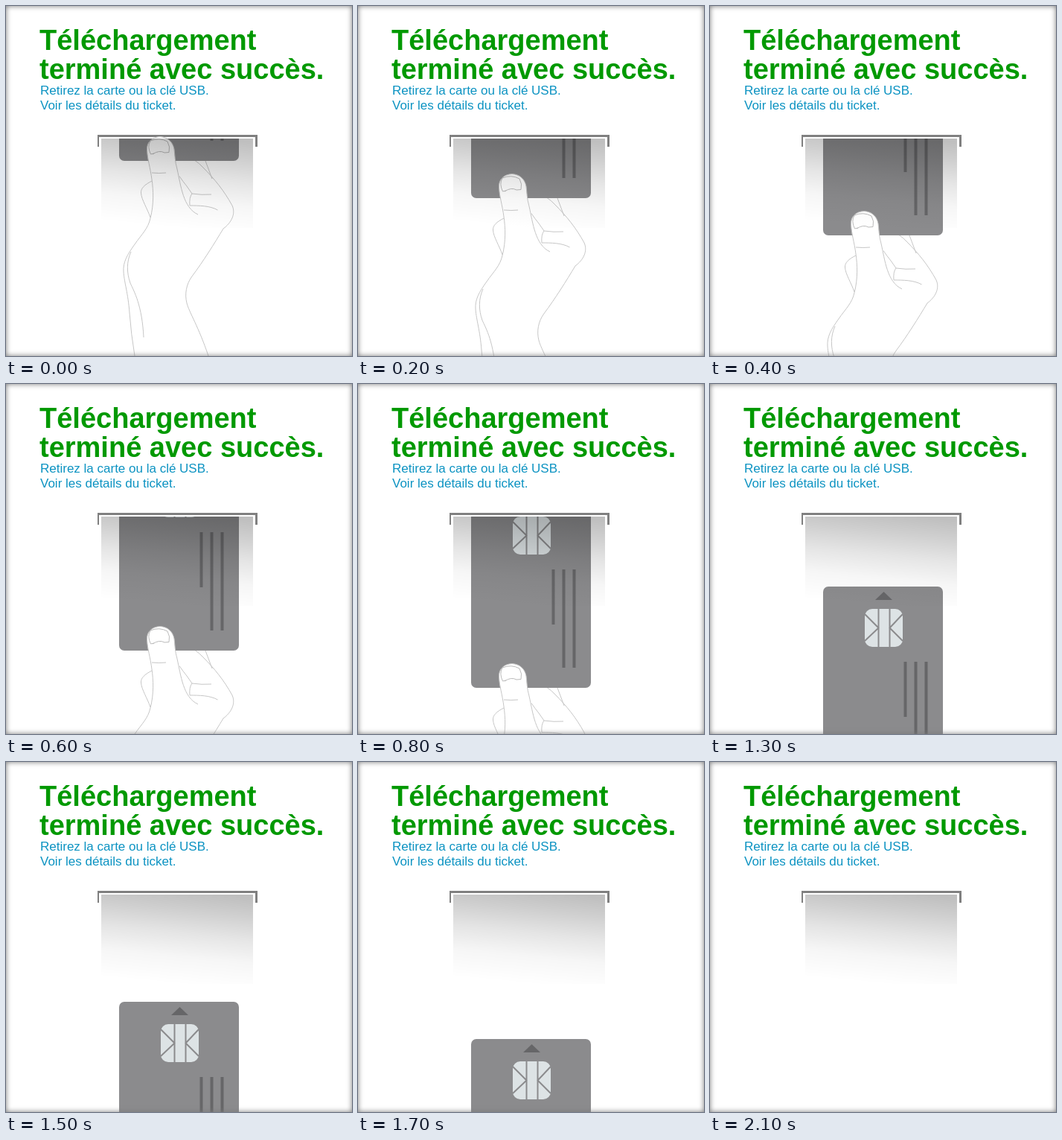
These frames come from a looping animation (465 by 470 pixels, 2.2 s). An HTML page with a canvas:

```html
<!DOCTYPE html>
<html lang="fr">
<head>
<meta charset="utf-8">
<title>Téléchargement terminé</title>
<style>
  html, body { margin: 0; width: 100%; height: 100%; overflow: hidden; background: #fff; }
  canvas, svg, .edge { position: absolute; left: 0; top: 0; width: 465px; height: 470px; }
  .edge { box-shadow: inset 0 0 7px #777; }
  text { font-family: "Liberation Sans", Arial, sans-serif; }
  .title { font-size: 38px; font-weight: bold; fill: #090; }
  .info { font-size: 17px; fill: #0c93c2; }
</style>
</head>
<body>
<canvas id="stage" width="465" height="470"></canvas>
<svg viewBox="0 0 465 470">
  <text class="title" x="45" y="59">Téléchargement</text>
  <text class="title" x="45" y="98">terminé avec succès.</text>
  <text class="info" x="46" y="119">Retirez la carte ou la clé USB.</text>
  <text class="info" x="46" y="139">Voir les détails du ticket.</text>
</svg>
<div class="edge"></div>
<script>
const ctx = document.getElementById('stage').getContext('2d');
const LOOP = 2200, STEP = 100, SLOT_Y = 178;
const GREY = '#8b8b8d', DARK = '#666668', LINE = '#c6c6c6';

// Hand paths, drawn for a card whose bottom edge is at y = 208
const thumbLeft = 'M207 175.5C196 176 189 183 189.500 193C190 206 194 217 196 233C198 247 199 266 194 285';
const thumbRight = 'M207 175.5C217 176 224 182 226 192C227 200 227 209 230 219C235 241 238 271 258 280';
const thumbFill = new Path2D(
  'M207 175.5C196 176 189 183 189.500 193C190 206 194 217 196 233Q198 247 198 262' +
  'L242 262C236 246 233 232 230 219C227 209 227 200 226 192C224 182 217 176 207 175.5Z');
const thumb = new Path2D(thumbLeft + thumbRight + 'M196 224Q206 225 215 224');
const nail = new Path2D(
  'M199 198L194.500 199Q189.500 189 194 181Q206 176 217 182Q221 189 219 196.500L213 197' +
  'M197 199Q206 193 213 197');
const hand = new Path2D(
  'M196 235C186 240 181 245 181.500 251C182 260 190 272 194 284' +
  'M194 285C191 299 182 307 173 320C163 334 157 344 158 357C159 372 164 385 166 412Q168 440 173 470V560' +
  'M168 330C162 343 162 358 167 372C172 383 183 402 185 445' +
  'M240 200Q256 207 264 216C281 233 293 248 304 268C309 279 303 291 292 299' +
  'C280 319 265 343 250 363C242 374 240 387 243 399C246 411 259 431 272 470L295 560' +
  'M265 200L277 232' +
  'M233 228.500Q238 236 243 242L250 252Q263 254 276 253' +
  'M250 252Q246 257 247 268C259 268 274 268 284.500 274');

const shade = ctx.createLinearGradient(240, 174, 228, 298);
[[0, .25], [.2, .19], [.45, .1], [.7, .035], [1, 0]].forEach(
  ([at, alpha]) => shade.addColorStop(at, `rgba(0,0,0,${alpha})`));

function box(color, x, y, w, h, r = 0) {
  ctx.fillStyle = color;
  ctx.beginPath();
  ctx.roundRect(x, y, w, h, r);
  ctx.fill();
}

function outline(path, color = LINE, width = 1) {
  ctx.strokeStyle = color;
  ctx.lineWidth = width;
  ctx.stroke(path);
}

function clipBelowSlot() {
  ctx.beginPath();
  ctx.rect(0, SLOT_Y, 465, 470);
  ctx.clip();
}

const arrow = new Path2D('M222 18L233.500 7L245 18Z');
const chipLines = new Path2D('M226.500 30V81M241.500 30V81M208 37L226.500 55.500L208 73M259 37L241.500 55.500L259 73');

function drawCard(top) {
  ctx.save();
  clipBelowSlot();
  ctx.translate(0, top);
  box(GREY, 152, 0, 161, 260, 7);
  ctx.fillStyle = DARK;
  ctx.fill(arrow);
  box('#dde3e5', 208, 30, 51, 51, 10);
  outline(chipLines, GREY, 2);
  box(DARK, 260.5, 101, 4, 74);
  box(DARK, 274.5, 101, 4, 132);
  box(DARK, 288.5, 101, 4, 132);
  ctx.restore();
}

function drawSlot() {
  box('#808080', 123, 173, 215, 3);
  box('#808080', 123, 173, 2, 16);
  box('#808080', 335, 173, 3, 16);
}

function draw(step) {
  const top = Math.round(-52 + 24.955 * step);
  const shift = top + 52;
  ctx.clearRect(0, 0, 465, 470);
  drawSlot();

  ctx.save();
  clipBelowSlot();
  ctx.translate(0, shift);
  outline(hand);
  ctx.restore();

  drawCard(top);

  ctx.save();
  ctx.translate(0, shift);
  ctx.fillStyle = '#fff';
  ctx.fill(thumbFill);
  outline(thumb);
  outline(nail, '#bbb');
  ctx.restore();

  box(shade, 128, SLOT_Y, 204, 120);
}

function tick() {
  draw(Math.floor(performance.now() % LOOP / STEP));
  requestAnimationFrame(tick);
}
tick();
</script>
</body>
</html>
```
